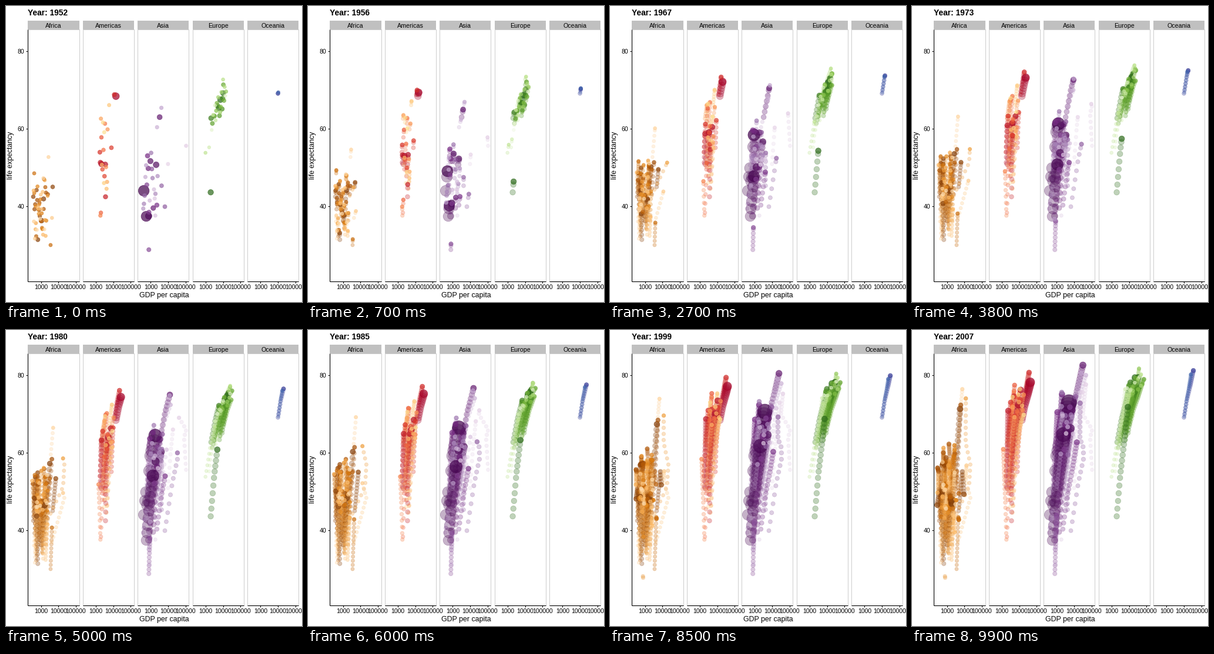
These frames come from a looping animation (504 px wide and 504 px high, 10000 ms). A matplotlib script:

```python
import numpy as np
import matplotlib.pyplot as plt
from matplotlib.animation import FuncAnimation
from matplotlib.colors import LinearSegmentedColormap
from matplotlib.patches import Rectangle

plt.rcParams["font.family"] = "Liberation Sans"

SIZE, FRAMES, TRAIL = 504, 100, 5
STEPS = np.arange(FRAMES) / 9          # five-year steps since 1952
TOP, BOTTOM, LEFT = 40, 468.6, 37.3
PITCH, WIDTH = 93.45, 87.2

# Each panel is a spread of countries ranked by population:
#   gdp:  mean and spread of log income at the start, mean and spread of growth
#   life: mean, slope on income and spread at the start
#   end:  mean, carry-over and spread at the end
#   known: rank -> log income start, end; life expectancy start, end
PANELS = {
    "Africa": dict(
        ramp=["#7f3b08", "#b35806", "#e08214", "#fdb863", "#fee0b6"],
        n=52, pop=lambda j: 135 / (1 + j) ** 0.8, share=0.27,
        gdp=(2.93, 0.22, 0.13, 0.2), life=(39, 3, 4.5), end=(52, 0.35, 6),
        known={0: (3.03, 3.30, 36.3, 46.9), 1: (3.15, 3.75, 41.9, 71.3),
               3: (2.89, 2.44, 39.1, 46.5), 4: (3.67, 3.97, 45, 49.3),
               9: (3.39, 3.79, 43.1, 72.3), 19: (3.55, 3.68, 30, 42.7),
               20: (2.61, 2.67, 48.5, 43.5), 28: (2.69, 2.94, 40, 46.2),
               32: (3.38, 4.08, 42.7, 74), 44: (3.63, 4.12, 37, 56.7),
               47: (3.43, 3.88, 52.7, 76.4)}),
    "Americas": dict(
        ramp=["#a50026", "#d73027", "#f46d43", "#fdae61", "#fee090"],
        n=25, pop=lambda j: 301 / (1 + j) ** 1.15, share=0.45,
        gdp=(3.45, 0.13, 0.36, 0.15), life=(51, 10, 6.5), end=(73, 0.25, 2.2),
        known={0: (4.15, 4.63, 68.4, 78.2), 1: (3.32, 3.96, 50.9, 72.4),
               2: (3.54, 4.08, 50.8, 76.2), 5: (4.06, 4.56, 68.8, 80.7),
               7: (3.89, 4.06, 55.1, 73.7), 14: (3.26, 3.08, 37.6, 60.9),
               17: (3.29, 3.62, 62.6, 71.8), 21: (3.76, 4.03, 66.1, 76.4),
               24: (3.48, 4.26, 59.1, 69.8)}),
    "Asia": dict(
        ramp=["#40004b", "#762a83", "#9970ab", "#c2a5cf", "#e7d4e8"],
        n=33, share=0.4,
        pop=lambda j: 1110 if j == 1 else 1318 / (1 + j) ** 1.4,
        gdp=(3.0, 0.23, 0.6, 0.25), life=(46, 8, 5), end=(69, 0.4, 3),
        known={0: (2.60, 3.70, 44, 73), 1: (2.74, 3.39, 37.4, 64.7),
               2: (2.88, 3.55, 37.5, 70.7), 5: (3.51, 4.50, 63, 82.6),
               12: (2.89, 2.99, 28.8, 43.8), 14: (3.81, 4.34, 39.9, 72.8),
               15: (3.62, 3.65, 45.3, 59.5), 22: (2.57, 3.23, 39.4, 59.7),
               24: (3.61, 4.41, 65.4, 80.7), 26: (3.36, 4.67, 60.4, 80),
               29: (3.26, 4.35, 37.6, 75.6), 31: (5.03, 4.67, 55.6, 77.6),
               32: (3.99, 4.47, 50.9, 75.6)}),
    "Europe": dict(
        ramp=["#276419", "#4d9221", "#7fbc41", "#b8e186", "#e6f5d0"],
        n=30, pop=lambda j: 90 * np.exp(-j / 6), share=0.78,
        gdp=(3.72, 0.24, 0.63, 0.12), life=(65.5, 10, 1.7),
        end=(77.3, 0.35, 1.3),
        known={0: (3.85, 4.51, 67.5, 79.4), 1: (3.29, 3.93, 43.6, 71.8),
               3: (4.0, 4.52, 69.2, 79.4), 17: (4.17, 4.57, 69.6, 81.7),
               22: (4.0, 4.69, 72.7, 80.2), 23: (2.99, 3.87, 53.8, 74.9),
               26: (3.20, 3.77, 55.2, 76.4)}),
    "Oceania": dict(
        ramp=["#313695", "#4065ad"],
        n=2, pop=lambda j: 20 / (1 + 4 * j), share=0.45,
        known={0: (4.0, 4.54, 69.1, 81.2), 1: (4.02, 4.40, 69.4, 80.2)}),
}

# Sharp turns on the way: step -> value
GDP_TURNS = {("Africa", 32): {3: 4.27, 5: 4.34, 7: 4.07},
             ("Africa", 44): {5: 4.34, 7: 4.07},
             ("Asia", 14): {5: 4.53, 6: 4.53, 7: 4.33},
             ("Asia", 31): {3: 4.91, 4: 5.04, 6: 4.50}}
LIFE_TURNS = {("Africa", 28): {6: 46.2, 7: 44, 8: 23.6, 9: 36.1},
              ("Asia", 0): {1: 50.5, 2: 44.5, 3: 58.4, 6: 65.5},
              ("Asia", 15): {7: 65},
              ("Asia", 22): {3: 45.4, 5: 31.2, 6: 51}}

rng = np.random.default_rng(7)


def panel_left(k):
    return LEFT + k * PITCH


def to_x(log_gdp, k):
    return panel_left(k) + (log_gdp - 2.2483) * WIDTH / 2.94


def to_y(life):
    return 341 - (life - 40) * 6.6


def spread(n):
    """Evenly covered, shuffled deviations."""
    return rng.permutation(np.linspace(-1.7, 1.7, n))


def countries(p):
    """Rows of income start, end and life expectancy start, end by rank."""
    known = p["known"]
    rows = np.zeros((p["n"], 4))
    rest = [j for j in range(p["n"]) if j not in known]
    for j, row in known.items():
        rows[j] = row
    if rest:
        mean, dev, rise, rise_dev = p["gdp"]
        base, slope, noise = p["life"]
        end, keep, end_noise = p["end"]
        g = dev * spread(len(rest))
        extra = slope * g + noise * spread(len(rest))
        rows[rest] = np.column_stack([
            mean + g, mean + g + rise + rise_dev * spread(len(rest)),
            base + extra, end + keep * extra + end_noise * spread(len(rest))])
    return rows


def track(start, end, turns):
    at = {0: start, **turns, 11: end}
    return np.interp(STEPS, list(at), list(at.values()))


def life_middle(name, start, end):
    gain = end - start
    if name == "Africa":               # early gains that later stall
        return {7: start + 9 + 0.35 * gain}
    return {3: start + 0.38 * gain, 6: start + 0.65 * gain}


def dot_area(pop):
    size = 2 + 10 * np.sqrt(pop / 1318)
    return (0.75 * (size * 2.845 + 0.945)) ** 2


xs, ys, areas, colors = [], [], [], []
for k, (name, p) in enumerate(PANELS.items()):
    ramp = LinearSegmentedColormap.from_list(name, p["ramp"], N=1024)
    for j, (g0, g1, l0, l1) in enumerate(countries(p)):
        gdp_mid = GDP_TURNS.get((name, j), {6: g0 + 0.64 * (g1 - g0)})
        life_mid = LIFE_TURNS.get((name, j), life_middle(name, l0, l1))
        xs.append(to_x(track(g0, g1, gdp_mid), k))
        ys.append(to_y(track(l0, l1, life_mid)))
        areas.append(dot_area(p["pop"](j) * p["share"] ** (1 - STEPS / 11)))
        colors.append(ramp(j / (p["n"] - 1)))

points = np.stack([np.array(xs).T, np.array(ys).T], axis=-1)
areas = np.array(areas).T
solid, faint = np.array(colors), np.array(colors)
solid[:, 3], faint[:, 3] = 0.7, 0.3

fig = plt.figure(figsize=(SIZE / 72, SIZE / 72), dpi=72, facecolor="white")
ax = fig.add_axes([0, 0, 1, 1])
ax.set(xlim=(0, SIZE), ylim=(SIZE, 0))
ax.axis("off")


def line(x0, y0, x1, y1):
    ax.plot([x0, x1], [y0, y1], color="black", lw=1.1, zorder=4,
            solid_capstyle="butt")


for k, name in enumerate(PANELS):
    left = panel_left(k)
    ax.add_patch(Rectangle((left, TOP), WIDTH, BOTTOM - TOP, fc="none",
                           ec="#cccccc", lw=1, zorder=3))
    ax.add_patch(Rectangle((left, 25.3), WIDTH, 14.4, fc="#c0c0c0", lw=0))
    ax.text(left + WIDTH / 2, 37.4, name, size=10.6, ha="center")
    line(left, BOTTOM, left + WIDTH, BOTTOM)
    for e in (3, 4, 5):
        x = to_x(e, k)
        line(x, BOTTOM, x, BOTTOM + 3.2)
        ax.text(x, 482, str(10 ** e), size=10.5, ha="center")

line(LEFT, TOP, LEFT, BOTTOM + 0.5)
for life in (40, 60, 80):
    y = to_y(life)
    line(LEFT - 3.4, y, LEFT, y)
    ax.text(31.4, y + 3.8, str(life), size=10.5, ha="right")

ax.text(269, 496, "GDP per capita", size=12.4, ha="center")
ax.text(14, 254, "life expectancy", size=12.2, rotation=90, ha="right",
        va="center")
title = ax.text(37, 16, "", size=13.8, weight="bold")
dots = ax.scatter([], [], linewidths=0.7, zorder=2)


def update(i):
    past = np.arange(0, i, TRAIL)
    shown = np.append(past, i)
    tint = np.vstack([np.tile(faint, (len(past), 1)), solid])
    dots.set_offsets(points[shown].reshape(-1, 2))
    dots.set_sizes(areas[shown].ravel())
    dots.set_facecolor(tint)
    dots.set_edgecolor(tint)
    title.set_text(f"Year: {round(1952 + 5 * STEPS[i])}")
    return dots, title


anim = FuncAnimation(fig, update, frames=FRAMES, interval=100, repeat=True,
                     repeat_delay=0)
plt.show()
```
